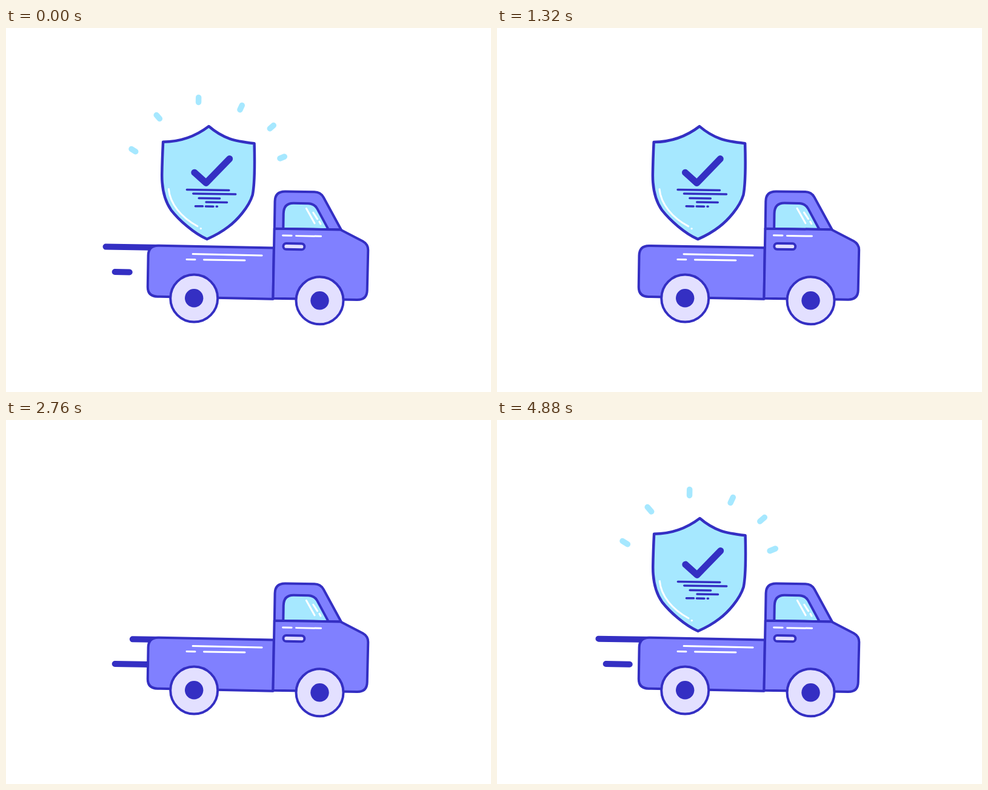
Recreate the animation shown at these times as an HTML page. Size 800x600 px, loop 4.92 s.

```html
<!DOCTYPE html>
<html lang="en">
<head>
<meta charset="utf-8">
<title>Safe delivery truck</title>
<style>
  html, body { margin: 0; width: 100%; height: 100%; overflow: hidden; background: #fff; }
  svg { display: block; width: 100vw; height: 100vh; }
  .ink { stroke: #342fc3; }
  .body { fill: #8080ff; }
  .sky { fill: #a6e8ff; }
  .pale { fill: #e3e0ff; }
  .hub { fill: #342fc3; stroke: none; }
  .shine { stroke: #fff; stroke-width: 3; fill: none; }
  .speed { stroke-width: 10; }
  #rays { stroke: #a6e8ff; stroke-width: 9.5; }
</style>
</head>
<body>
<svg viewBox="0 0 800 600" stroke-linecap="round" stroke-linejoin="round" fill="none">
  <g id="rays"></g>
  <g id="tilt" class="ink" stroke-width="4">
    <line id="upper" class="speed" y1="364.3" y2="364.3"/>
    <line id="lower" class="speed" y1="405.5" y2="405.5"/>

    <g id="shield" stroke-width="4.5">
      <path class="sky" d="M330 163C342 173 353 179 365 183Q376 187 405.5 190C407 225 407.500 255 404 275C398 296 378 318 365 328Q350 340 330 349C308 340 283 318 270 302C260 288 254 268 254 243Q254 220 255 190Q297 189 330 163Z"/>
      <path class="shine" stroke-width="3.500" d="M265.500 267.500C268 292 287 314 314 328M319.300 331.800h.4"/>
      <path id="check" stroke-width="11" pathLength="100" d="M307.500 239.500L327 256.500L365 216"/>
      <path stroke-width="3.500" d="M295.500 268H365M306 274.300H376M315.500 281.700H350M327.500 288H362M310 295H322M327 295H339.500M344.800 295H346"/>
    </g>

    <path class="body" d="M440.500 361.700L250 361Q233.500 361 233.500 377.500V429Q233.500 445 250 445L440.500 446Z"/>
    <path class="body" d="M441 330V285Q441 268.500 458 268.500H506Q516 268.500 521 277L551 330Z"/>
    <path class="sky" d="M455.500 330V305Q455.500 287.500 472 287.500H496Q506 287.500 511 296L530 330Z"/>
    <path class="body" d="M440.800 330H550L587 348.500Q596 353.500 596 363L595.500 429Q595.500 445 579 445H440.500Z"/>
    <rect class="pale" x="456" y="354" width="35" height="9.800" rx="4.900"/>
    <path class="shine" d="M455 341H469.500M477 341.300H518M307 374L421 374.500M297 383H311M325.500 383H393M493 296L507 320M504.500 302.500L511.500 313M515 317.500L517 321"/>
  </g>
  <g id="wheels" class="ink" stroke-width="4">
    <circle class="pale" cx="310.200" cy="445.200" r="39"/>
    <circle class="hub" cx="310.200" cy="445" r="15.200"/>
    <circle class="pale" cx="517.500" cy="449" r="39"/>
    <circle class="hub" cx="517.500" cy="449" r="15.200"/>
  </g>
</svg>
<script>
const $ = id => document.getElementById(id);
const LOOP = 123;      // loop length in ticks of 40 ms
const TICK = 40;
const clamp = (v, a = 0, b = 1) => Math.min(b, Math.max(a, v));
const span = (t, a, b) => clamp((t - a) / (b - a));
const mod = (v, n) => ((v % n) + n) % n;
const sine = p => (1 - Math.cos(Math.PI * p)) / 2;
const quart = p => p < 0.5 ? 8 * p ** 4 : 1 - 8 * (1 - p) ** 4;

// Outer tip and direction towards the shield
const rays = [
  [207, 199.500, 32], [248.200, 143.500, 49], [317.700, 114.500, 91],
  [389.300, 127.500, 115], [441.300, 160.500, 139], [459.300, 212, 158]
].map(([x, y, deg]) => {
  const el = document.createElementNS("http://www.w3.org/2000/svg", "line");
  $("rays").append(el);
  const a = deg * Math.PI / 180;
  return { el, x, y, dx: Math.cos(a), dy: Math.sin(a) };
});

function setLine(el, x1, x2, y1, y2) {
  el.setAttribute("x1", x1);
  el.setAttribute("x2", x2);
  if (y1 !== undefined) {
    el.setAttribute("y1", y1);
    el.setAttribute("y2", y2);
  }
}

function show(el, on) {
  el.style.display = on ? "" : "none";
}

// Rocks through 1, 0, -1, 0 with a soft stop at each pose
function rock(t) {
  const poses = [1, 0, -1, 0, 1];
  const p = mod(t * 7 / LOOP + 0.035, 1) * 4;
  const i = Math.floor(p);
  return poses[i] + (poses[i + 1] - poses[i]) * quart(p - i);
}

// Shoots out to the left, then its right end catches up
function speedLine(el, left, phase) {
  const u = mod(phase + 8, LOOP / 5) - 8;
  const head = u < 5.8 ? 1.66 * (5.8 - u) ** 2 : 0;
  const tail = Math.min(92, (12.93 - u) * 15);
  show(el, tail > head);
  setLine(el, left + head, left + tail);
}

function drawShield(t) {
  const grow = span(t, 79, 99);
  const scale = t < 72 ? 1 - sine(span(t, 44, 64)) : sine(grow);
  const turn = 7.3 * Math.sin(Math.PI * grow);
  const el = $("shield");
  show(el, scale > 0.002);
  el.setAttribute("transform",
    `translate(330 349) rotate(${turn}) scale(${scale}) translate(-330 -349)`);

  const drawn = t < 72 ? 1 : sine(span(t, 96, 106));
  show($("check"), drawn > 0);
  $("check").setAttribute("stroke-dasharray", drawn < 1 ? `${drawn * 100} 200` : "none");
}

function drawRays(t) {
  const s = t < 50 ? t + LOOP : t;
  const head = 30 * (1 - span(s, 107, 114.5));
  const tail = 30 * (1 - span(s, 112, 127));
  show($("rays"), tail > head);
  for (const { el, x, y, dx, dy } of rays) {
    setLine(el, x + dx * head, x + dx * tail, y + dy * head, y + dy * tail);
  }
}

function draw(ms) {
  const t = mod(ms / TICK, LOOP);
  const r = rock(t);
  $("tilt").setAttribute("transform", `rotate(${r * 0.92} 395 445)`);
  $("wheels").setAttribute("transform", `translate(0 ${r * 0.3})`);
  speedLine($("upper"), 163, t + 5.4);
  speedLine($("lower"), 179, t + 11.3);
  drawShield(t);
  drawRays(t);
}

const start = performance.now();
function loop() {
  draw(performance.now() - start);
  requestAnimationFrame(loop);
}
loop();
</script>
</body>
</html>
```
